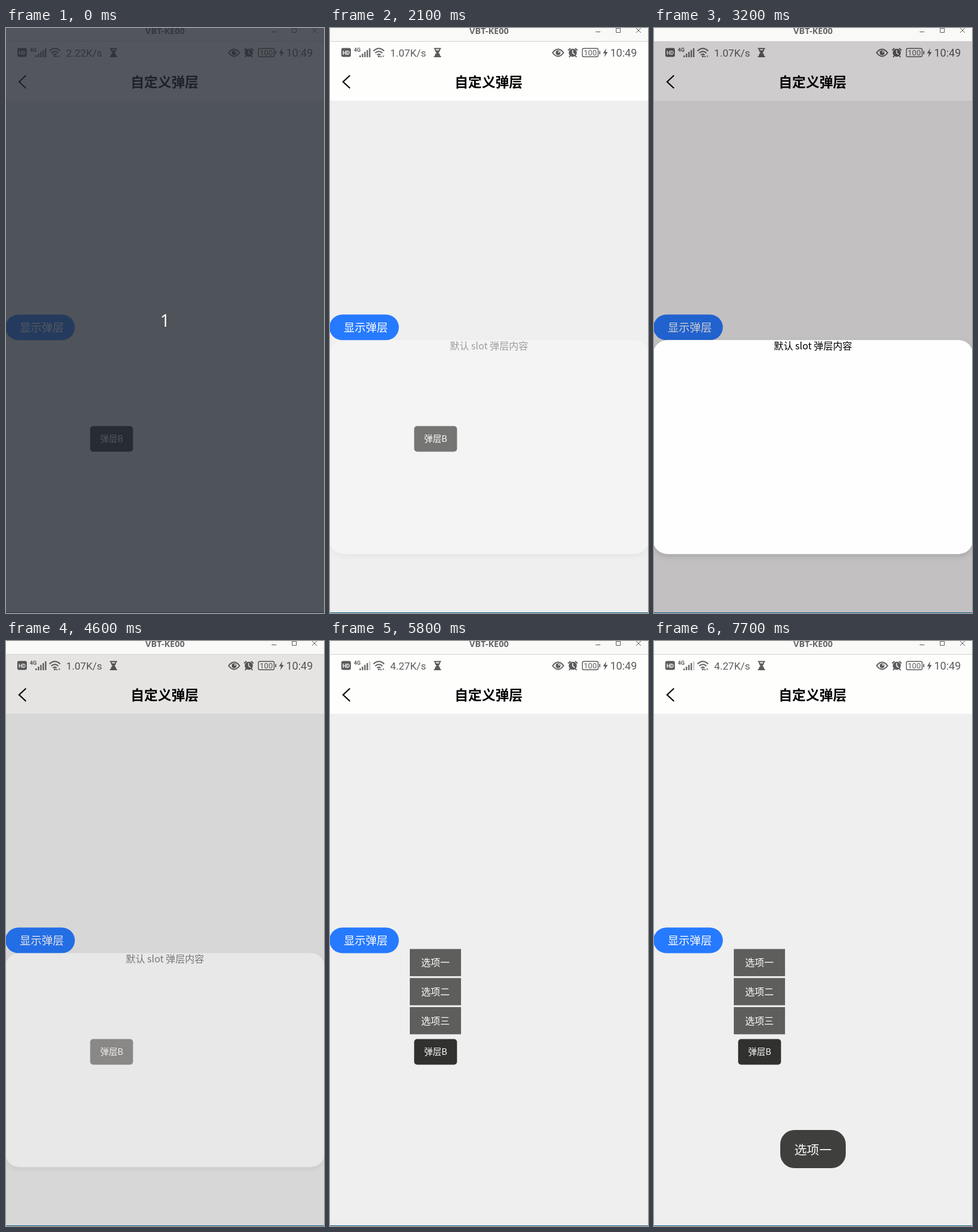
Animation of 534x981 px, one loop 8 s. Source, as an HTML page:

```html
<!DOCTYPE html>
<html lang="zh">
<head>
<meta charset="utf-8">
<title>自定义弹层</title>
<style>
  html, body { margin: 0; width: 100%; height: 100%; overflow: hidden; }
  svg { display: block; width: 100%; height: 100%; }
  text { font-family: "Noto Sans CJK SC", "Noto Sans CJK", "Noto Sans", sans-serif; }
  .latin { font-family: Roboto, sans-serif; }
  .mid { text-anchor: middle; }
  .line { fill: none; stroke: #5c5c5c; }
  #popup rect { filter: drop-shadow(0 4px 5px rgba(0, 0, 0, .13)); }
</style>
</head>
<body>
<svg viewBox="0 0 534 981">
  <!-- phone page -->
  <rect width="534" height="981" fill="#efefef"/>
  <rect y="23" width="534" height="99" fill="#fefefd"/>
  <g fill="#5c5c5c">
    <rect x="19" y="33.500" width="16" height="15" rx="3"/>
    <text class="latin mid" x="27" y="44.500" font-size="9" font-weight="700" fill="#fff">HD</text>
    <text class="latin" x="40" y="40" font-size="9" font-weight="700">4G</text>
    <g id="bars"></g>
    <path class="line" stroke-width="2" d="M73 38.500Q82 30 91 38.500M76 42Q82 36.500 88 42M79 45.300Q82 42.500 85 45.300"/>
    <circle cx="82" cy="47.500" r="1.600"/>
    <path d="M85.500 46.500l1.700 2.500h-3.400zM89.500 49l-1.700-2.500h3.400z"/>
    <text id="speed" class="latin" x="101" y="48" font-size="17.200"></text>
    <path d="M174.500 33.500h12v2h-1.500q0 4-3 6q3 2 3 5.500h1.500v2h-12v-2h1.500q0-3.500 3-5.500q-3-2-3-6h-1.500z"/>
    <path d="M177.500 35.500h6l-1 2h-4z" fill="#fefefd"/>

    <path class="line" stroke-width="1.800" d="M373.800 41.500q9.200-12 18.500 0q-9.300 12-18.500 0z"/>
    <circle cx="383" cy="41.500" r="4"/>
    <circle cx="384.500" cy="40" r="1.300" fill="#fefefd"/>
    <circle cx="407.700" cy="41.500" r="6.800"/>
    <path class="line" stroke-width="2" d="M399.800 37.500l4-3.500M415.600 37.500l-4-3.500M403.500 46.500l-2 2.500M412 46.500l2 2.500"/>
    <path d="M407.500 37v5l3.500 2.500" fill="none" stroke="#fefefd" stroke-width="1.500"/>
    <rect class="line" x="423.700" y="34.200" width="26.600" height="14" rx="2.500" stroke-width="1.400"/>
    <text class="latin mid" x="437" y="46" font-size="13">100</text>
    <rect x="452" y="38.500" width="1.800" height="5.500"/>
    <path d="M464 34l-5.500 8.500h3.500l-1.500 6.500l6-8.800h-3.800z"/>
    <text class="latin" x="470.500" y="48" font-size="18">10:49</text>
  </g>
  <path d="M33.500 79.500L22 90.200L33.500 101" fill="none" stroke="#000" stroke-width="2.200"/>
  <text class="mid" x="266.300" y="98.700" font-size="22.800" font-weight="700">自定义弹层</text>

  <rect x="-1" y="480.500" width="116.600" height="43" rx="21.500" fill="#267aff"/>
  <text x="23" y="508.800" font-size="18.500" fill="#fff">显示弹层</text>
  <rect x="141.300" y="667.500" width="72" height="43" rx="5" fill="#31312f"/>
  <text class="mid" x="177.500" y="694.300" font-size="14.500" fill="#fff">弹层B</text>

  <!-- layers -->
  <g id="options"></g>
  <rect id="mask" y="23" width="534" height="957" fill="#0c0006"/>
  <g id="popup">
    <rect x="-1.500" y="523.200" width="537" height="359" rx="24" fill="#fefefe"/>
    <text class="mid" x="267" y="539" font-size="16.100">默认 slot 弹层内容</text>
  </g>
  <g id="toast">
    <rect x="212" y="820" width="110" height="64" rx="24" fill="#3f3f3d"/>
    <text class="mid" x="267" y="860.800" font-size="20.800" fill="#fff">选项一</text>
  </g>

  <!-- desktop window -->
  <rect width="534" height="22" fill="#f9f9f7"/>
  <rect y="22" width="534" height="1" fill="#d2d2d0"/>
  <text class="mid" x="267" y="10" font-size="14.500" font-weight="700" fill="#666" style="font-family:'Noto Sans',sans-serif">VBT-KE00</text>
  <path class="line" d="M446 6.500h8M480.500 .5h7v7h-7zM514 0l8 8M522 0l-8 8"/>
  <rect y="980" width="534" height="1" fill="#075a86"/>

  <g id="countdown">
    <rect width="534" height="981" fill="#262a33" opacity=".79"/>
    <text class="mid" x="267" y="501" font-size="30" fill="#fff" style="font-family:'Open Sans',sans-serif">1</text>
  </g>
</svg>
<script>
const LOOP = 8000, STEP = 100, MASK = 0.195;
const el = id => document.getElementById(id);
const clamp = v => Math.max(0, Math.min(1, v));
const ramp = (t, from, to) => clamp((t - from) / (to - from));
const fade = (node, opacity) => node.setAttribute("opacity", opacity);

el("bars").innerHTML = [3, 6, 9, 12, 15].map((h, i) =>
  `<rect x="${49.5 + i * 4}" y="${49 - h}" width="2.2" height="${h}"/>`).join("");

el("options").innerHTML = ["一", "二", "三"].map((n, i) => {
  const y = 516.5 + i * 48.7;
  return `<rect x="134" y="${y}" width="86" height="45.6" fill="#5e5e5c"/>
    <text class="mid" x="177" y="${y + 28.8}" font-size="16" fill="#fff">选项${n}</text>`;
}).join("");

function draw(t) {
  const open = t < 4600;
  const closing = ramp(t, 5100, 4600) ** 2;
  fade(el("countdown"), +(t < 100));
  fade(el("popup"), open ? ramp(t, 2000, 2300) : 0.44 * closing);
  fade(el("mask"), open ? MASK * ramp(t, 2200, 2900) : 0.1 * closing);
  fade(el("options"), +(t >= 5800));
  fade(el("toast"), ramp(t, 7500, 7700));
  fade(el("bars").lastElementChild, t < 5100 ? 1 : 0.35);
  el("speed").textContent = t < 2100 ? "2.22K/s" : t < 5100 ? "1.07K/s" : "4.27K/s";
}

function frame(now) {
  draw(Math.floor(now % LOOP / STEP) * STEP);
  requestAnimationFrame(frame);
}
draw(0);
requestAnimationFrame(frame);
</script>
</body>
</html>
```
